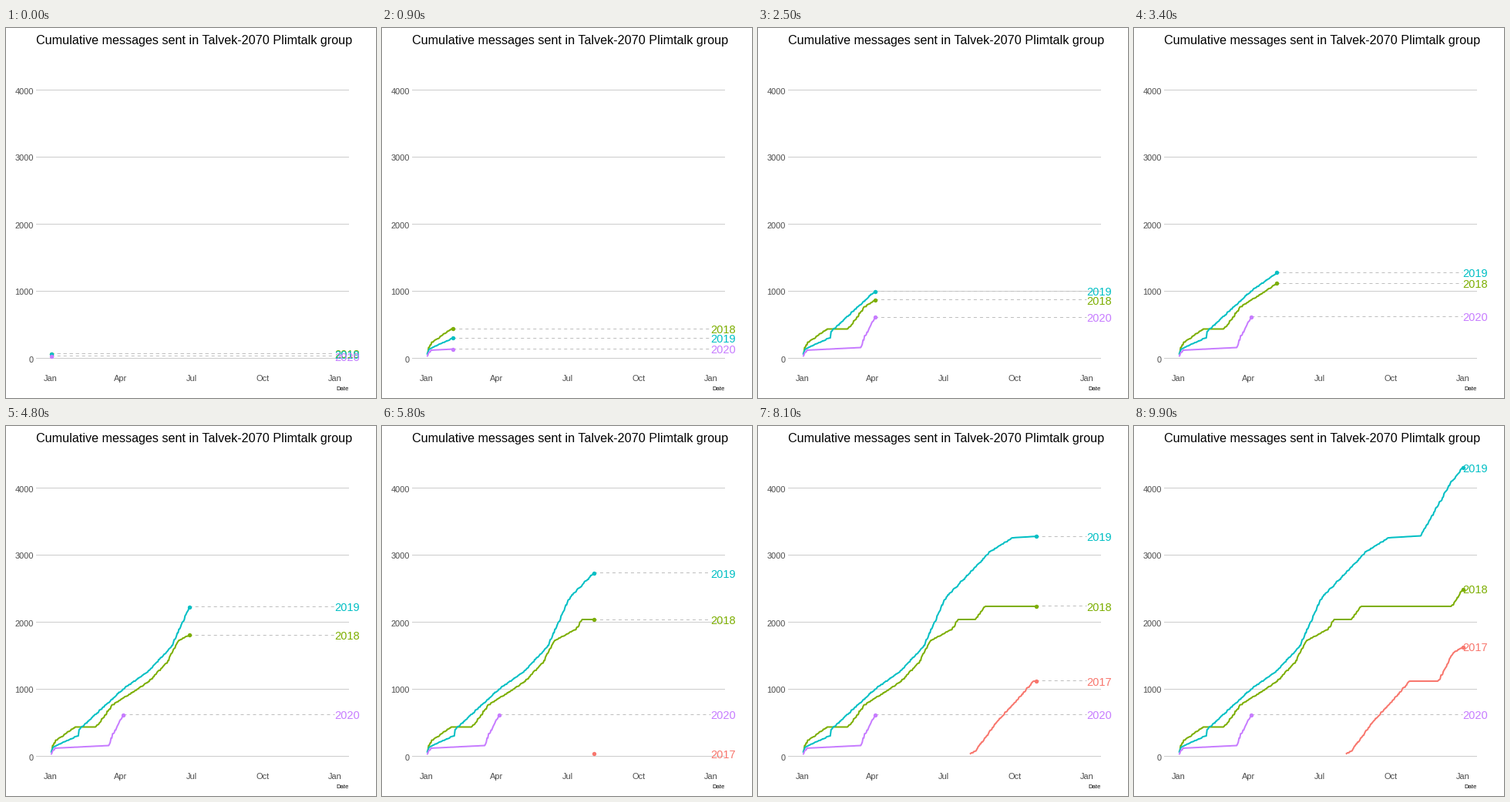
Animation, 480 px wide and 480 px high, one loop 10 s. Source, as a matplotlib script:

```python
import matplotlib.pyplot as plt
import numpy as np
from matplotlib.animation import FuncAnimation

SIZE, DPI, FRAMES, DAYS = 480, 100, 100, 365
PX = 72 / DPI  # points per pixel
END_X = 426.5

plt.rcParams["font.family"] = "Liberation Sans"
plt.rcParams["lines.solid_capstyle"] = "butt"


def to_x(day):
    return 57.4 + day * 369.1 / DAYS


def to_y(total):
    return 428.5 - total * 0.087


def write(x, y, text, size, color="black", ha="left"):
    return ax.text(x, y, text, fontsize=size * PX, color=color, ha=ha,
                   va="baseline")


def stroke(color, width, **style):
    return ax.plot([], [], color=color, lw=width * PX, snap=False, **style)[0]


class Series:
    """A year's running total, sketched by its (day, total) turning points."""

    def __init__(self, year, color, *turns):
        rng = np.random.default_rng(year)
        day, total = np.transpose(turns)
        self.start, self.end = day[0], day[-1]
        self.days = np.arange(self.start, self.end + 1)
        # uneven daily counts give the curve its small steps
        wobble = rng.uniform(-1.2, 1.2, self.days.size)
        wobble[[0, -1]] = 0
        self.totals = np.sort(np.interp(self.days + wobble, day, total))

        self.line = stroke(color, 2, zorder=3)
        self.dash = stroke("#bebebe", 1, ls=(0, (4, 4)), dash_capstyle="butt",
                           zorder=2)
        self.dot, = ax.plot([], [], "o", color=color, ms=5.4 * PX, mew=0, zorder=4)
        self.label = write(426, 0, str(year), 14.67, color)
        self.label.set_zorder(5)
        self.artists = [self.line, self.dash, self.dot, self.label]

    def show(self, now):
        for artist in self.artists:
            artist.set_visible(now >= self.start)
        now = np.clip(now, self.start, self.end)
        past = self.days < now
        x, y = to_x(now), to_y(np.interp(now, self.days, self.totals))
        row = np.floor(y) + 0.5
        self.line.set_data(np.append(to_x(self.days[past]), x),
                           np.append(to_y(self.totals[past]), y))
        self.dash.set_data([x, END_X], [row, row])
        if now < self.start + 0.2:
            self.dash.set_visible(False)
        self.dot.set_data([x], [y])
        self.label.set_y(y + 5.7)


fig = plt.figure(figsize=(SIZE / DPI, SIZE / DPI), dpi=DPI, facecolor="white")
ax = fig.add_axes([0, 0, 1, 1])
ax.set_xlim(0, SIZE)
ax.set_ylim(SIZE, 0)
ax.axis("off")

for total in range(0, 5000, 1000):
    y = to_y(total)
    stroke("#cccccc", 1, zorder=1).set_data([39, 445], [y, y])
    write(36, y + 5, str(total), 11, "#4d4d4d", "right")
for day, month in zip((0, 90, 181, 273, 365), ("Jan", "Apr", "Jul", "Oct", "Jan")):
    write(to_x(day), 458, month, 11, "#4d4d4d", "center")
write(445, 470.5, "Date", 7.6, ha="right")
write(39, 21.5, "Cumulative messages sent in Talvek-2070 Plimtalk group", 16.1)

series = [
    Series(2017, "#F8766D", (215, 34), (223, 86), (249, 500), (297, 1121),
           (334, 1121), (352, 1534), (365, 1632)),
    Series(2018, "#7CAE00", (1, 65), (6, 224), (32, 437), (59, 437), (80, 765),
           (127, 1118), (152, 1431), (164, 1718), (193, 1902), (200, 2040),
           (222, 2040), (235, 2236), (351, 2236), (365, 2494)),
    Series(2019, "#00BFC4", (1, 55), (3, 132), (35, 305), (37, 400), (93, 1000),
           (125, 1259), (156, 1640), (184, 2362), (241, 3052), (270, 3259),
           (311, 3287), (351, 4098), (365, 4299)),
    Series(2020, "#C77CFF", (1, 25), (6, 121), (76, 161), (78, 270), (94, 620)),
]


def update(i):
    now = (i + 0.35) / (FRAMES - 1) * DAYS
    for s in series:
        s.show(now)
    return [artist for s in series for artist in s.artists]


anim = FuncAnimation(fig, update, frames=FRAMES, interval=100, repeat=True,
                     repeat_delay=0, blit=False)
plt.show()
```
